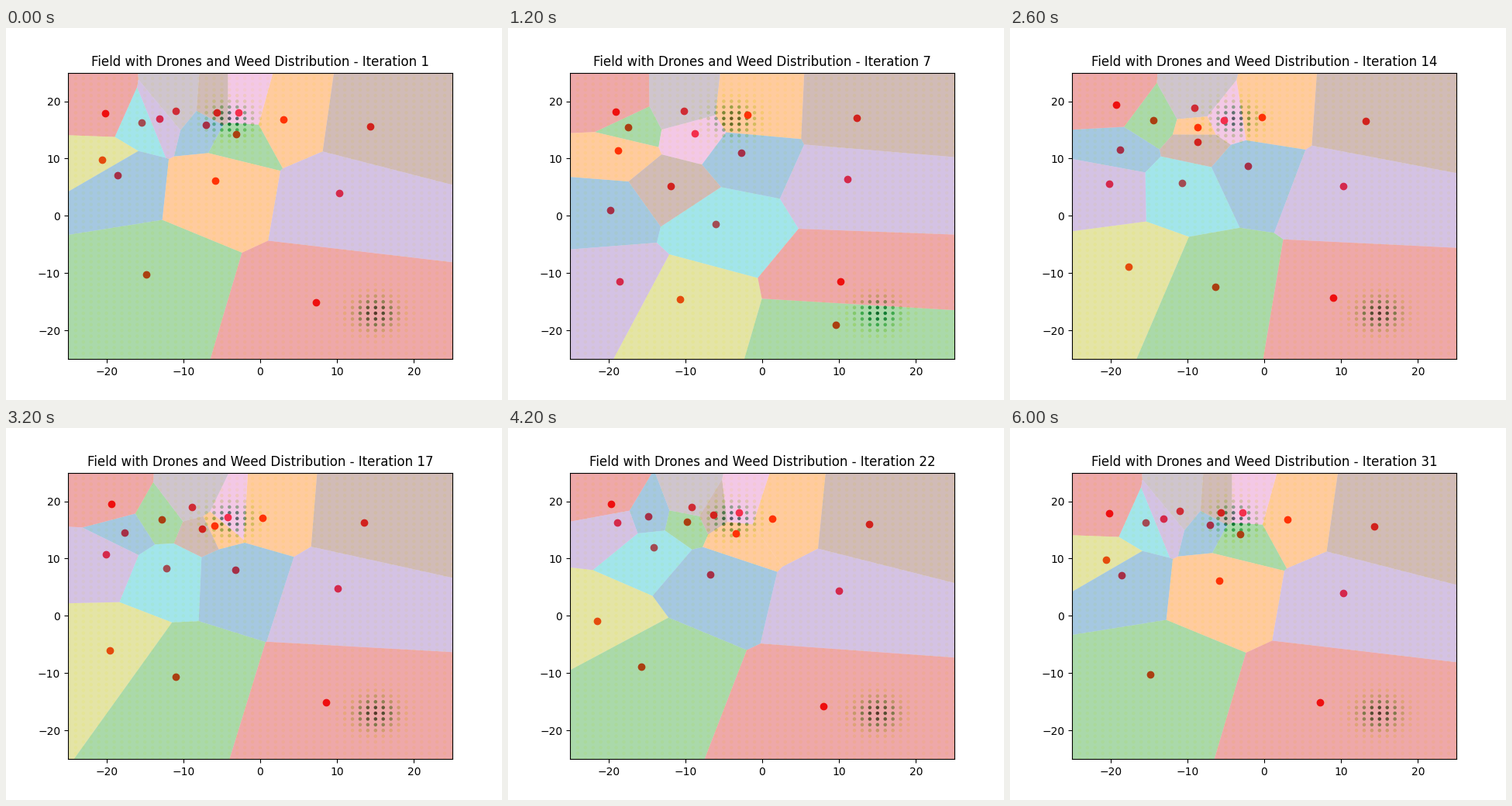
A matplotlib script for the animation above (6200 ms loop, 640 px wide and 480 px high).

```python
import numpy as np
import matplotlib.pyplot as plt
from matplotlib.animation import FuncAnimation
from matplotlib.patches import Polygon

FRAMES, STEP_MS = 31, 200
HALF = 25
BOX = [(-HALF, -HALF), (HALF, -HALF), (HALF, HALF), (-HALF, HALF)]
TINTS = ["C0", "C1", "C2", "C3", "C4", "C5", "C6", "#876f86", "C8", "C9"]

# Each drone drifts along a parabola: early, middle and settled place (x + yj)
PATH_TIMES = (6, 16, 30)
PATHS = np.array([
    (-19.8 + 1.0j, -17.6 + 14.5j, -7.1 + 15.9j),
    (-1.9 + 17.6j, 0.3 + 17.1j, 3.0 + 16.8j),
    (-17.4 + 15.5j, -12.8 + 16.8j, -3.1 + 14.3j),
    (-19.1 + 18.2j, -19.4 + 19.6j, -20.2 + 17.9j),
    (11.1 + 6.4j, 10.1 + 4.8j, 10.3 + 4.0j),
    (12.3 + 17.1j, 13.5 + 16.3j, 14.3 + 15.6j),
    (-8.8 + 14.4j, -4.2 + 17.3j, -2.8 + 18.0j),
    (-10.2 + 18.3j, -8.9 + 19.0j, -11.0 + 18.3j),
    (-10.7 - 14.6j, -19.6 - 6.0j, -20.6 + 9.8j),
    (-6.0 - 1.5j, -12.2 + 8.3j, -15.4 + 16.3j),
    (-2.7 + 11.0j, -3.2 + 8.0j, -18.5 + 7.1j),
    (-18.7 + 11.4j, -5.9 + 15.8j, -5.8 + 6.1j),
    (9.6 - 19.0j, -11.0 - 10.6j, -14.8 - 10.2j),
    (10.2 - 11.5j, 8.6 - 15.1j, 7.3 - 15.1j),
    (-18.5 - 11.5j, -20.1 + 10.7j, -13.1 + 17.0j),
    (-11.9 + 5.2j, -7.6 + 15.2j, -5.6 + 18.0j),
])


def blend_weights(t):
    """Weights of the parabola through the three path points."""
    a, b, c = PATH_TIMES
    return np.array([
        (t - b) * (t - c) / ((a - b) * (a - c)),
        (t - a) * (t - c) / ((b - a) * (b - c)),
        (t - a) * (t - b) / ((c - a) * (c - b)),
    ])


def pose(frame):
    """Drone positions; the loop opens on the settled state."""
    z = PATHS @ blend_weights(frame if frame else FRAMES - 1)
    return np.clip(np.column_stack([z.real, z.imag]), -24, 24)


def clip_closer(poly, a, b):
    """Keep the part of poly that is nearer to a than to b."""
    normal, mid = b - a, (a + b) / 2
    out = []
    for p, q in zip(poly, poly[1:] + poly[:1]):
        dp, dq = np.dot(p - mid, normal), np.dot(q - mid, normal)
        if dp <= 0:
            out.append(p)
        if dp * dq < 0:
            out.append(p + (q - p) * dp / (dp - dq))
    return out


def voronoi_cell(i, sites):
    poly = [np.array(c, float) for c in BOX]
    for j, other in enumerate(sites):
        if j != i:
            poly = clip_closer(poly, sites[i], other)
    return np.array(poly)


def weed_patch(x, y, cx, cy, sigma=2):
    return np.exp(-((x - cx) ** 2 + (y - cy) ** 2) / (2 * sigma ** 2))


fig, ax = plt.subplots(figsize=(6.4, 4.8), dpi=100)
ax.set_xlim(-HALF, HALF)
ax.set_ylim(-HALF, HALF)

gx, gy = np.meshgrid(np.arange(-HALF, HALF + 1), np.arange(-HALF, HALF + 1))
weeds = weed_patch(gx, gy, -3.8, 16.9) + weed_patch(gx, gy, 15, -17)
ax.scatter(gx, gy, c=weeds, cmap="YlGn", s=5, zorder=1)

sites = pose(0)
dots = ax.scatter(sites[:, 0], sites[:, 1], c="red", s=36, zorder=1)
cells = [
    ax.add_patch(Polygon(voronoi_cell(i, sites), facecolor=TINTS[i % len(TINTS)],
                         alpha=0.4, lw=0, zorder=1.1))
    for i in range(len(PATHS))
]
title = ax.set_title("")


def update(frame):
    sites = pose(frame)
    dots.set_offsets(sites)
    for i, cell in enumerate(cells):
        cell.set_xy(voronoi_cell(i, sites))
    title.set_text(f"Field with Drones and Weed Distribution - Iteration {frame + 1}")
    return [dots, title, *cells]


anim = FuncAnimation(fig, update, frames=FRAMES, interval=STEP_MS, repeat=True, repeat_delay=0)
plt.show()
```
